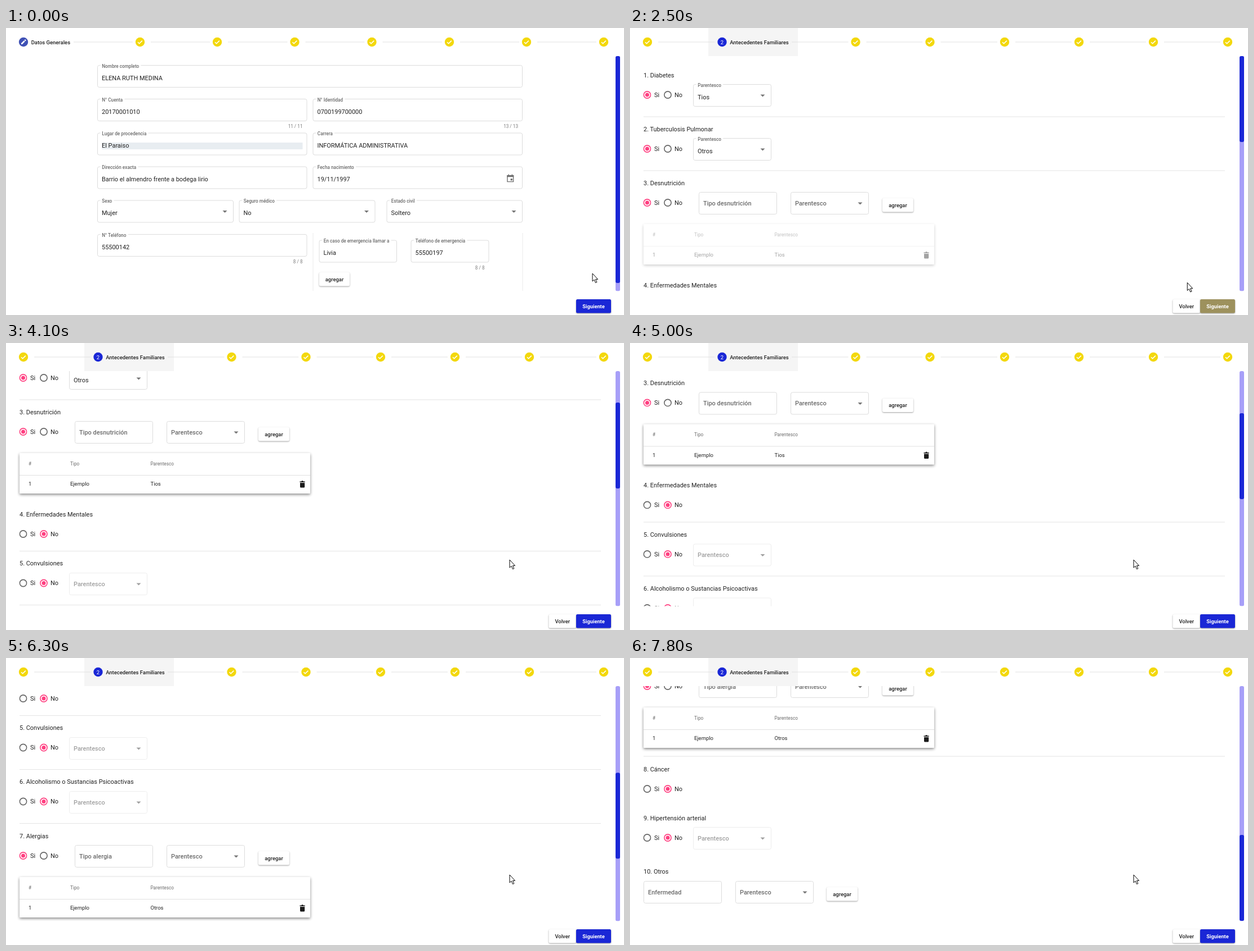
Animation, 1097 px wide and 511 px high, one loop 8 s. Source, as an HTML page:

```html
<!DOCTYPE html>
<html lang="es">
<head>
<meta charset="utf-8">
<title>Formulario por pasos</title>
<style>
html, body { margin: 0; width: 100%; height: 100%; overflow: hidden; background: #fff; }
svg { display: block; width: 1097px; height: 511px; font-family: Roboto, Arial, sans-serif; }
.btn { filter: drop-shadow(0 1px 1px rgba(0, 0, 0, .38)); }
.card { filter: drop-shadow(0 2px 2.5px rgba(0, 0, 0, .48)); }
</style>
</head>
<body>
<svg id="stage" viewBox="0 0 1097 511"></svg>
<script>
const BLUE = [26, 39, 214], GOLD = [245, 215, 12];
const rgb = c => `rgb(${c.map(Math.round)})`;
const INK = '#212121', GREY = '#6b6b6b', PINK = '#ff4081';
const BODY = 10.95, SMALL = 8.2, MID = 9.45;

// y is the middle of the capitals
function text(x, y, s, size = BODY, fill = INK, weight = 400, anchor = 'start') {
  return `<text x="${x}" y="${(y + size * .355).toFixed(2)}" font-size="${size}" fill="${fill}" font-weight="${weight}" text-anchor="${anchor}">${s}</text>`;
}
const rect = (x, y, w, h, fill, more = '') =>
  `<rect x="${x}" y="${y}" width="${w}" height="${h}" fill="${fill}" ${more}/>`;
const path = (d, fill, more = '') => `<path d="${d}" fill="${fill}" ${more}/>`;
const rule = (x1, x2, y, c = '#e4e4e4') => rect(x1, y, x2 - x1, 1, c);
const caret = (x, y, c) => path(`M${x - 4} ${y - 2}h8l-4 4z`, c);

function labelWidth(s) {
  const c = document.createElement('canvas').getContext('2d');
  c.font = `500 ${SMALL}px Roboto, Arial, sans-serif`;
  return c.measureText(s).width;
}

// outlined field: floating label when it has a value, otherwise a placeholder
function field(x, y, w, label, value, o = {}) {
  const off = o.off;
  let s = rect(x + .5, y + .5, w - 1, 39, 'none', `rx="3" stroke="${off ? '#ededed' : '#dcdcdc'}"`);
  if (value) {
    s += rect(x + 5.5, y - 1, labelWidth(label) + 6, 3, '#fff');
    s += text(x + 8.3, y + 1.8, label, SMALL, GREY, 500);
    if (o.fill) s += rect(x + 8, y + 17.5, w - 16, 12, '#e8edf1');
    s += text(x + 8, y + 23, value);
  } else {
    s += text(x + 8, y + 20, label, BODY, off ? '#a0a0a0' : GREY, 500);
  }
  if (o.select) s += caret(x + w - 15.5, y + 20.5, off ? '#a0a0a0' : '#757575');
  if (o.count) s += text(x + w - 8, y + 49.5, o.count, SMALL, '#7d7d7d', 400, 'end');
  return s;
}

function button(x, y, w, label) {
  return rect(x, y, w, 24.5, '#fff', 'rx="2.5" class="btn"') +
    text(x + w / 2, y + 12.3, label, MID, INK, 500, 'middle');
}

function radio(x, y, on) {
  return `<circle cx="${x}" cy="${y}" r="6.1" fill="none" stroke="${on ? PINK : '#666'}" stroke-width="1.6"/>` +
    (on ? `<circle cx="${x}" cy="${y}" r="3.5" fill="${PINK}"/>` : '');
}

function section(y, title, yes, extra = '', line = 74) {
  let s = text(24, y, title);
  if (yes !== null) {
    s += radio(30.5, y + 35, yes) + text(43, y + 35, 'Si') +
      radio(67, y + 35, !yes) + text(79, y + 35, 'No');
  }
  return s + extra + (line ? rule(24, 1056, y + line - .5) : '');
}

const relative = (x, y, value, off) => field(x, y, 139, 'Parentesco', value, { select: 1, off });

function table(y, kin) {
  const top = y + 19, row = y + 55;
  return '<g class="late">' + rect(24, y, 516, 72, '#fff', 'class="card" rx="1"') +
    rule(24, 540, y + 39, '#e0e0e0') +
    text(40, top, '#', SMALL, GREY) + text(114, top, 'Tipo', SMALL, GREY) +
    text(256.5, top, 'Parentesco', SMALL, GREY) +
    text(40, row, '1', MID) + text(114, row, 'Ejemplo', MID) + text(256.5, row, kin, MID) +
    path(`M521.5 ${y + 50.5}h2.6l1-1.2h2l1 1.2h2.6v1.5h-9.2zM522 ${y + 53}h8.2v7q0 1.6-1.6 1.6h-5q-1.6 0-1.6-1.6z`, '#1b1b1b') +
    '</g>';
}

const listing = (y, kind, kin) =>
  field(122, y + 16, 139, kind) + relative(285, y + 16) +
  button(448, y + 27, 55, 'agregar') + table(y + 73, kin);

const scrollBar = (track, y, h) =>
  rect(1082, 50, 8, 418.5, track, 'rx="3"') +
  rect(1082, y, 8, h, rgb(BLUE), 'rx="3" class="thumb"');

const pageOne = () =>
  field(162, 66, 755, 'Nombre completo', 'ELENA RUTH MEDINA') +
  field(162, 126, 372.5, 'N° Cuenta', '20170001010', { count: '11 / 11' }) +
  field(544.5, 126, 372.5, 'N° Identidad', '0700199700000', { count: '13 / 13' }) +
  field(162, 186.5, 372.5, 'Lugar de procedencia', 'El Paraiso', { fill: 1 }) +
  field(544.5, 186.5, 372.5, 'Carrera', 'INFORMÁTICA ADMINISTRATIVA') +
  field(162, 246.5, 372.5, 'Dirección exacta', 'Barrio el almendro frente a bodega lirio') +
  field(544.5, 246.5, 372.5, 'Fecha nacimiento', '19/11/1997') +
  path('M890 262.6h10.6v11h-10.6z', 'none', 'stroke="#6f6f6f" stroke-width="1.4"') +
  path('M889.4 262h11.8v3.2h-11.8zM891.5 260.5h1.5v2h-1.5zM897.6 260.5h1.5v2h-1.5zM895.6 268.2h3.4v3.4h-3.4z', '#6f6f6f') +
  field(162, 306.5, 242, 'Sexo', 'Mujer', { select: 1 }) +
  field(413.5, 306.5, 242, 'Seguro médico', 'No', { select: 1 }) +
  field(675.5, 306.5, 241.5, 'Estado civil', 'Soltero', { select: 1 }) +
  field(162, 367, 372.5, 'N° Teléfono', '55500142', { count: '8 / 8' }) +
  rect(544.5, 365, 1, 103, '#ececec') + rect(916.5, 365, 1, 103, '#ececec') +
  field(555.5, 377.5, 138.5, 'En caso de emergencia llamar a', 'Livia') +
  field(718.5, 377.5, 139, 'Teléfono de emergencia', '55500197', { count: '8 / 8' }) +
  button(556, 435, 54, 'agregar') +
  scrollBar('#a79ff8', 50, 404);

const pageTwo = () =>
  section(84, '1. Diabetes', true, relative(112, 100, 'Tios')) +
  section(180, '2. Tuberculosis Pulmonar', true, relative(112, 196, 'Otros')) +
  section(276, '3. Desnutrición', true, listing(276, 'Tipo desnutrición', 'Tios'), 0) +
  section(458, '4. Enfermedades Mentales', false, '', 65.5) +
  section(545.5, '5. Convulsiones', false, relative(112, 562, '', 1)) +
  section(641.5, '6. Alcoholismo o Sustancias Psicoactivas', false, relative(112, 658, '', 1)) +
  section(738, '7. Alergias', true, listing(738, 'Tipo alergia', 'Otros'), 160) +
  section(921, '8. Cáncer', false, '', 0) +
  section(1008, '9. Hipertensión arterial', false, relative(112, 1024, '', 1), 0) +
  section(1103.5, '10. Otros', null,
    field(24, 1120, 139, 'Enfermedad') + relative(187, 1120) + button(349, 1131, 55, 'agregar'), 0);

function stepper(xs, active, label) {
  const names = xs.map((x, i) => i === active ? label : '');
  let s = '';
  xs.forEach((x, i) => {
    const on = i === active;
    const end = on ? (i ? 282 : 115) + 5 : x + 19;
    if (i < xs.length - 1) s += rule(end, xs[i + 1] - 13, 24.5, '#e2e2e2');
    s += `<circle cx="${x}" cy="25" r="8.2" fill="${on ? (i ? rgb(BLUE) : '#3f51b5') : '#f3d80c'}"/>`;
    if (!on) s += path(`M${x - 4} 25.2l2.6 2.6l5.2-5.2`, 'none', 'stroke="#fff" stroke-width="1.5"');
    else if (i) s += text(x, 25.2, i + 1, MID, '#fff', 400, 'middle');
    else s += path(`M${x - 4} 29v-1.9l4.9-4.9l1.9 1.9l-4.9 4.9zM${x + 1.5} 21.6l1-1q.5-.4 1 0l1 1q.4.5 0 1l-1 1z`, '#fff');
    if (on) s += text(x + 13.7, 25.3, names[i], MID, INK, 500);
  });
  return s;
}

const stage = document.getElementById('stage');
stage.innerHTML = `
<defs><clipPath id="view"><rect x="20" y="50" width="1071" height="418.5"/></clipPath></defs>
<g clip-path="url(#view)">
  <g id="one">${pageOne()}</g>
  <g id="two"><g id="list">${pageTwo()}</g><g id="bar">${scrollBar('#a79ff8', 50, 153)}</g></g>
</g>
<g id="headOne">${stepper([31, 238, 375, 512.5, 649.5, 787, 924, 1061], 0, 'Datos Generales')}</g>
<g id="headTwo">${rect(139, 0, 159, 50, '#f5f5f5')}${stepper([31, 163.5, 400.5, 532.5, 665, 797, 929, 1061], 1, 'Antecedentes Familiares')}</g>
<g id="back">${button(963.5, 483, 48.5, 'Volver')}</g>
<rect id="next" x="1012" y="483" width="62" height="24.5" rx="2.5" class="btn"/>
${text(1043, 495.2, 'Siguiente', 9.3, '#fff', 700, 'middle')}
<g id="mouse" stroke="#000" stroke-width="1" stroke-linejoin="round" fill="#fff">
  <path id="arrow" d="M0 0V14L3.2 11.2L5.5 16.6L7.8 15.6L5.5 10.4H9.6Z"/>
  <path id="hand" d="M-1.5 1.5Q-1.5 0 0 0Q1.5 0 1.5 1.5V7Q4 5.8 4.6 7.6Q7 6.6 7.4 8.6Q9.6 8 9.6 10.5V13Q9.6 15 8 17V19H-1V17Q-4 13.5 -5 11Q-4.6 9 -2.5 10.5L-1.5 11.5Z"/>
</g>`;

const $ = id => document.getElementById(id);
const late = [...document.querySelectorAll('.late')];
const thumb = $('bar').querySelector('.thumb');
const show = (el, on) => el.setAttribute('display', on ? 'inline' : 'none');
const move = (el, x, y) => el.setAttribute('transform', `translate(${x.toFixed(2)} ${y.toFixed(2)})`);
const clamp = v => Math.max(0, Math.min(1, v));
const smooth = p => p * p * (3 - 2 * p);

const LOOP = 8000, STEP = 100;
// [start, number of steps, distance]
const scrolls = [[3500, 7, 153], [4800, 7, 131], [6000, 8, 274], [7300, 6, 165]];

function draw(time) {
  const t = Math.floor((time % LOOP) / STEP) * STEP;
  const steps = (start, n) => clamp(((t - start) / STEP + 1) / n);
  const ease = (start, n) => smooth(steps(start, n));

  const second = t >= 1600;
  const slide = ease(1600, 5);
  const scroll = scrolls.reduce((sum, [start, n, d]) => sum + d * ease(start, n), 0);
  show($('one'), slide < 1);
  show($('two'), second);
  show($('headOne'), !second);
  show($('headTwo'), second);
  show($('back'), second);
  move($('one'), -1097 * slide, 0);
  move($('two'), 1097 * (1 - slide), 0);
  move($('list'), 0, -scroll);
  thumb.setAttribute('y', 50 + scroll * 418.5 / 1142);
  late.forEach(g => g.setAttribute('opacity', steps(2400, 5)));

  const hover = t < 2400 ? clamp((t - 1350) / 250) : clamp((2650 - t) / 250);
  $('next').setAttribute('fill', rgb(BLUE.map((b, i) => b + (GOLD[i] - b) * hover)));

  const down = ease(700, 8), away = ease(2400, 5);
  const x = 1041 - 147 * away, y = 437 + 53 * down - 104 * away;
  const over = y >= 483 && x > 963;
  move($('mouse'), x, y);
  show($('hand'), over);
  show($('arrow'), !over);
}

const begin = performance.now();
function tick() {
  draw(performance.now() - begin);
  requestAnimationFrame(tick);
}
tick();
</script>
</body>
</html>
```
